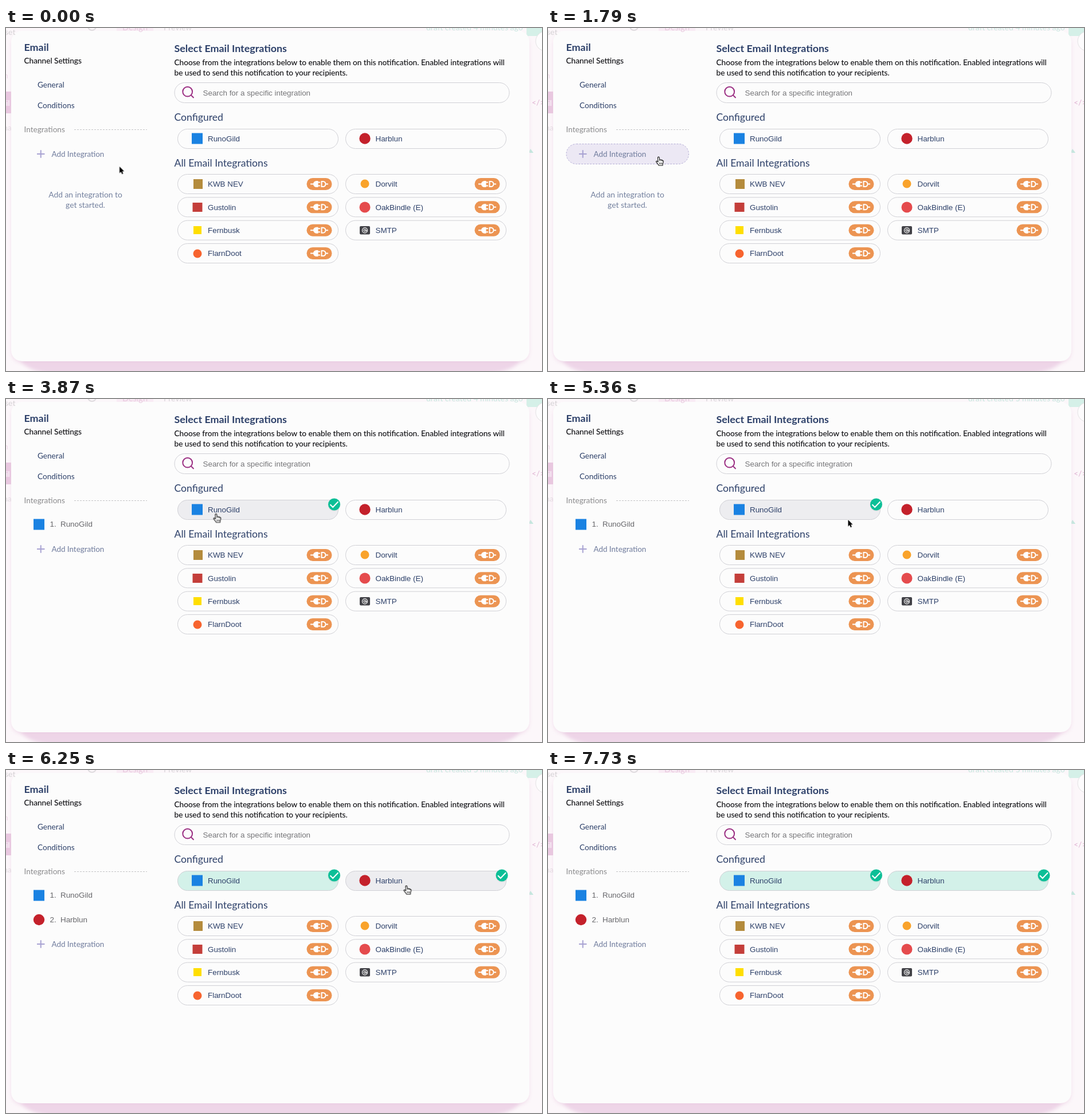
These frames come from a looping animation (935 by 599 pixels, 8180 ms). An HTML page:

```html
<!DOCTYPE html>
<html lang="en">
<head>
<meta charset="utf-8">
<title>Email channel settings</title>
<style>
html, body { margin: 0; width: 100%; height: 100%; overflow: hidden; background: #fcf7fa; }
svg { display: block; width: 935px; height: 599px; }
text { font: 13.6px Lato, "Open Sans", sans-serif; fill: #2d4069; white-space: pre; }
.title { font-size: 17.9px; font-weight: 700; }
.head { font-size: 17.6px; }
.body { font-size: 13.63px; fill: #0c0c10; stroke: #0c0c10; stroke-width: .1px; }
.soft { fill: #6f7b9c; }
.grey { fill: #8b8b8d; }
.hint { font-size: 13.8px; fill: #73809e; text-anchor: middle; }
.ui { font: 13.4px "Liberation Sans", Arial, sans-serif; }
.item { fill: #67676b; }
.back { font-size: 14px; }
.pill { fill: transparent; stroke: #d0d0d5; }

/* Every state holds until the next keyframe */
.anim, .anim * { animation: 8180ms step-end infinite; }
#place { animation-name: place; }
#caret { animation-name: caret; }
#hover { animation-name: hover; }
#add { animation-name: add; }
#hint { animation-name: until-one; }
.one { animation-name: from-one; }
.two { animation-name: from-two; }
#pillA { animation-name: pill-a; }
#pillB { animation-name: pill-b; }
#min4 { animation-name: min-old; }
#min5 { animation-name: min-new; }
#cursor { animation-name: move; }
#arrow { animation-name: arrow; }
#hand { animation-name: hand; }
#cursor path { animation: none; }
.one *, .two * { animation: none; }

@keyframes place { 0% { opacity: 1 } 5.5% { opacity: 0 } 21.88% { opacity: 1 } }
@keyframes caret {
  0% { opacity: 0 } 5.5% { opacity: 1 } 11% { opacity: 0 }
  18.33% { opacity: 1 } 21.88% { opacity: 0 }
}
@keyframes hover {
  0% { opacity: 0 } 12.83% { opacity: .1 } 14.66% { opacity: 1 }
  31.05% { opacity: .6 } 32.88% { opacity: 0 }
}
@keyframes add {
  0% { transform: none } 47.31% { transform: translateY(42px) } 76.4% { transform: translateY(84px) }
}
@keyframes until-one { 0% { opacity: 1 } 47.31% { opacity: 0 } }
@keyframes from-one { 0% { opacity: 0 } 47.31% { opacity: 1 } }
@keyframes from-two { 0% { opacity: 0 } 76.4% { opacity: 1 } }
@keyframes pill-a {
  0% { fill: #fcfcfc } 34.59% { fill: #f5f5f6 } 36.3% { fill: #ededf0 }
  67.35% { fill: #dff0ec } 69.07% { fill: #d3f1e9 }
}
@keyframes pill-b {
  0% { fill: #fcfcfc } 69.07% { fill: #f5f5f6 } 70.9% { fill: #ededf0 }
  85.57% { fill: #dff0ec } 87.28% { fill: #d3f1e9 }
}
@keyframes min-old { 0% { opacity: 1 } 58.31% { opacity: 0 } }
@keyframes min-new { 0% { opacity: 0 } 58.31% { opacity: 1 } }
@keyframes move {
  0% { transform: translate(198px, 241px) }
  11% { transform: translate(195px, 234px) }
  12.83% { transform: translate(193px, 228.5px) }
  14.66% { transform: translate(193px, 225px) }
  31.05% { transform: translate(200px, 222px) }
  32.88% { transform: translate(262px, 214px) }
  34.59% { transform: translate(336px, 204px) }
  36.3% { transform: translate(366.5px, 200.5px) }
  58.31% { transform: translate(373px, 203px) }
  60.14% { transform: translate(395px, 206px) }
  61.85% { transform: translate(432px, 208px) }
  63.69% { transform: translate(482px, 209px) }
  65.52% { transform: translate(523.5px, 210px) }
  67.35% { transform: translate(592px, 208px) }
  69.07% { transform: translate(662px, 203px) }
  70.9% { transform: translate(698.5px, 202px) }
  83.74% { transform: translate(712px, 209px) }
  85.57% { transform: translate(745px, 221px) }
  87.28% { transform: translate(802px, 223px) }
  89.11% { transform: translate(860px, 212px) }
  90.83% { transform: translate(884px, 155px) }
  92.66% { transform: translate(893px, 48px) }
  94.49% { transform: translate(893px, -40px) }
}
@keyframes arrow {
  0% { opacity: 1 } 11% { opacity: 0 } 27.38% { opacity: 1 } 34.59% { opacity: 0 }
  65.52% { opacity: 1 } 69.07% { opacity: 0 } 85.57% { opacity: 1 }
}
@keyframes hand {
  0% { opacity: 0 } 11% { opacity: 1 } 27.38% { opacity: 0 } 34.59% { opacity: 1 }
  65.52% { opacity: 0 } 69.07% { opacity: 1 } 85.57% { opacity: 0 }
}
</style>
</head>
<body>
<svg viewBox="0 0 935 599">
  <defs>
    <filter id="blur" x="-10%" y="-10%" width="120%" height="120%"><feGaussianBlur stdDeviation="3"/></filter>
    <rect id="pill" x=".5" y=".5" width="280" height="34" rx="17"/>
    <g id="plug">
      <rect width="44" height="21" rx="10.5" fill="#ec9452"/>
      <path d="M6.500 10.500h7M19 7.500h4.500M19 13.500h4.500M33 10.500h4.500" fill="none" stroke="#fff" stroke-width="2"/>
      <path d="M20 5v11h-3a5.500 5.500 0 0 1 0-11z" fill="#fff"/>
      <path d="M26 6h2.500a4.500 4.500 0 0 1 0 9H26z" fill="none" stroke="#fff" stroke-width="2"/>
    </g>
    <g id="row">
      <use href="#pill" class="pill"/>
      <use href="#plug" x="225.500" y="7"/>
    </g>
    <g id="check">
      <circle cy="1" r="11" fill="#000" opacity=".06"/>
      <circle r="10.500" fill="#0cbf97"/>
      <path d="M-7 .2l4.700 4.800 9.300-9.800" fill="none" stroke="#fff" stroke-width="2"/>
    </g>
  </defs>

  <!-- Page behind the dialog -->
  <rect width="935" height="599" fill="#fcf7fa"/>
  <rect x="193" y="-10" width="64" height="18" fill="#f9ecf5"/>
  <circle cx="150" cy="-3" r="7" fill="none" stroke="#dedbde" stroke-width="2"/>
  <path d="M908 0h27v14h-27z" fill="#d5f0e8"/>
  <circle cx="941" cy="23" r="17" fill="#fdfcfd" stroke="#e4e2e4"/>
  <path d="M911 218h9l-5-7z" fill="#c2e9de"/>
  <rect y="111" width="10" height="38" fill="#e9c8e0"/>
  <text class="back" x="-7" y="136" style="fill:#fff">ail</text>
  <text class="back" x="-4" y="88" style="fill:#f0d9e9">n</text>
  <text class="back" x="-5" y="179" style="fill:#e2dde1">ha</text>
  <text class="back" x="917" y="135" style="fill:#dfb2d2">&lt;/&gt;</text>
  <rect x="25" y="500" width="872" height="106" rx="80" ry="30" fill="#eed6e8" filter="url(#blur)"/>
  <rect x="9" y="10" width="904" height="575" rx="20" fill="#e9c9e0" opacity=".5" filter="url(#blur)"/>

  <!-- Dialog -->
  <rect x="9" y="5" width="904" height="577" rx="19" fill="#fcfcfc"/>
  <text class="back" x="-2" y="12" style="fill:#d5d2d5">set</text>
  <text class="back" x="203" y="4" style="fill:#e8c9de;font-size:14.500px">Design</text>
  <text class="back" x="275" y="4" style="fill:#d8d5d9">Preview</text>
  <g class="anim">
    <text id="min4" class="back" x="733" y="4" style="fill:#c6e8df">draft created 4 minutes ago</text>
    <text id="min5" class="back" x="733" y="4" style="fill:#c6e8df">draft created 5 minutes ago</text>
  </g>

  <!-- Sidebar -->
  <text class="title" x="31.500" y="39.500">Email</text>
  <text class="body" x="31.500" y="61.500">Channel Settings</text>
  <text x="55" y="103.500">General</text>
  <text x="55" y="140">Conditions</text>
  <text class="grey" x="31.500" y="182">Integrations</text>
  <path d="M119 177.500h127" stroke="#c4c4c6" stroke-dasharray="3 2"/>
  <g class="anim">
    <rect id="hover" x="32" y="202.500" width="213.500" height="35" rx="17.500" fill="#ece8f4" stroke="#b5aed6" stroke-dasharray="3 2"/>
    <g id="add">
      <path d="M54 220h13.500M60.750 213.250v13.500" stroke="#a8a2d2" stroke-width="2"/>
      <text class="soft" x="79.500" y="225" style="font-size:13.400px">Add Integration</text>
    </g>
    <g id="hint">
      <text class="hint" x="138.500" y="296">Add an integration to</text>
      <text class="hint" x="138.500" y="314">get started.</text>
    </g>
    <g class="one">
      <rect x="48" y="209.500" width="19" height="19" fill="#1a82e2"/>
      <text class="ui item" x="76.500" y="223.300">1.</text>
      <text class="ui item" x="95" y="223.300">RunoGild</text>
    </g>
    <g class="two">
      <circle cx="57.500" cy="261.500" r="9.700" fill="#c4212b"/>
      <text class="ui item" x="76.500" y="266.300">2.</text>
      <text class="ui item" x="95" y="266.300">Harblun</text>
    </g>
  </g>

  <!-- Main column -->
  <text class="title" x="293.500" y="42">Select Email Integrations</text>
  <text class="body" x="293.500" y="65">Choose from the integrations below to enable them on this notification. Enabled integrations will</text>
  <text class="body" x="293.500" y="83">be used to send this notification to your recipients.</text>
  <rect x="294" y="95.500" width="584" height="35" rx="17.500" fill="#fcfcfc" stroke="#d0d0d5"/>
  <g fill="none" stroke="#9b2f83" stroke-width="2">
    <circle cx="316.700" cy="111.200" r="8.400"/>
    <path d="M322.500 117l5 5"/>
  </g>
  <g class="anim">
    <text id="place" class="ui" x="343.500" y="117.500" style="fill:#757578">Search for a specific integration</text>
    <rect id="caret" x="344" y="106" width="1" height="15" fill="#222"/>
  </g>

  <text class="head" x="293.500" y="162">Configured</text>
  <g class="anim">
    <rect id="pillA" class="pill" x="299.500" y="176.500" width="280" height="34" rx="17"/>
    <rect id="pillB" class="pill" x="592.500" y="176.500" width="280" height="34" rx="17"/>
    <g class="one"><use href="#check" x="572.500" y="184"/></g>
    <g class="two"><use href="#check" x="865" y="184"/></g>
  </g>
  <rect x="324" y="183.500" width="19" height="19" fill="#1a82e2"/>
  <circle cx="626" cy="193" r="9.700" fill="#c4212b"/>
  <text class="ui" x="352" y="198">RunoGild</text>
  <text class="ui" x="644.500" y="198">Harblun</text>

  <text class="head" x="293.500" y="242">All Email Integrations</text>
  <use href="#row" x="299" y="255"/>
  <use href="#row" x="299" y="295.300"/>
  <use href="#row" x="299" y="335.700"/>
  <use href="#row" x="299" y="376"/>
  <use href="#row" x="592" y="255"/>
  <use href="#row" x="592" y="295.300"/>
  <use href="#row" x="592" y="335.700"/>

  <rect x="327" y="264" width="16" height="17" fill="#b48b3c"/>
  <rect x="325.500" y="305" width="17" height="16" fill="#c43e3a"/>
  <rect x="327" y="346" width="14" height="14" fill="#ffde00"/>
  <circle cx="334" cy="394" r="7.500" fill="#f7642f"/>
  <circle cx="626" cy="272" r="7.500" fill="#f9a32b"/>
  <circle cx="626" cy="313" r="9.500" fill="#e54b4d"/>
  <rect x="617" y="346" width="18" height="14.500" rx="2" fill="#424247"/>
  <circle cx="626" cy="353.300" r="4.500" fill="none" stroke="#fff" stroke-width="1.200"/>
  <circle cx="626" cy="353.300" r="1.800" fill="none" stroke="#fff" stroke-width="1.200"/>
  <path d="M628 352v2.500q1.500 1 2.300-1" fill="none" stroke="#fff"/>

  <text class="ui" x="352" y="277.300">KWB NEV</text>
  <text class="ui" x="352" y="317.700">Gustolin</text>
  <text class="ui" x="352" y="358">Fernbusk</text>
  <text class="ui" x="352" y="398.300">FlarnDoot</text>
  <text class="ui" x="644.500" y="277.300">Dorvilt</text>
  <text class="ui" x="644.500" y="317.700">OakBindle (E)</text>
  <text class="ui" x="644.500" y="358">SMTP</text>

  <g class="anim">
    <g id="cursor">
      <g id="arrow">
        <path transform="translate(0 1) scale(.88)" d="M0 0V13L3 10.200 5 15 7.300 14 5.300 9.400 9.300 9.300Z" fill="#000" stroke="#fff" stroke-width="1.600" paint-order="stroke"/>
      </g>
      <g id="hand" stroke="#111" stroke-width="1.100" stroke-linejoin="round">
        <path d="M-1.500 1.200C-1.500-.3 1.100-.3 1.200 1.200L1.600 5.200C2.500 4.400 4 4.800 4.200 5.600 5.200 5 6.300 5.400 6.600 6.300 7.800 6 8.200 7 8.200 8 8.200 10 7.600 11 7.200 12L7 15H.2C-.3 13.500-2.500 11.500-4.300 8.800-4.900 7.500-3.200 6.800-2 8L-1 9Z" fill="#fff"/>
        <path d="M1.600 5.200V7.500M4.200 5.600V7.700M6.600 6.300V8M1.500 10v3M3.500 10v3M5.500 10v3" fill="none" stroke-width=".8"/>
      </g>
    </g>
  </g>
</svg>
</body>
</html>
```
